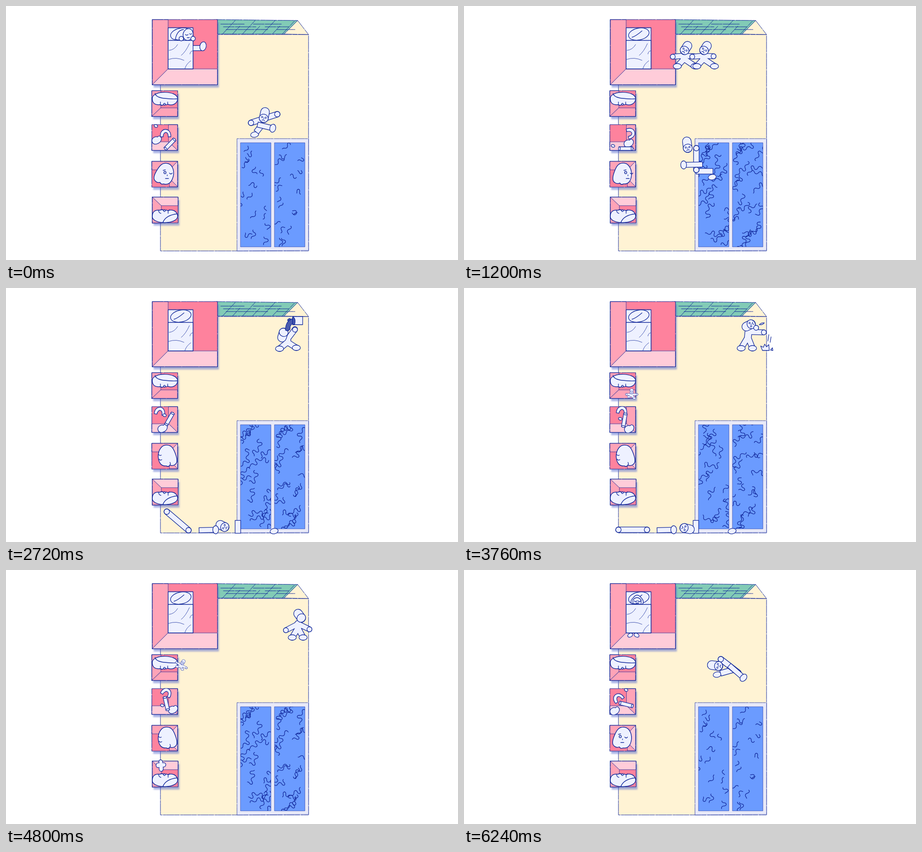
Write an HTML page with a canvas that moves like this. It is 998x561 px and loops after 6.32 s.

```html
<!DOCTYPE html>
<html lang="en">
<head>
<meta charset="utf-8">
<title>House loop</title>
<style>
html, body { margin: 0; width: 100%; height: 100%; overflow: hidden; background: #fff; }
canvas { display: block; }
</style>
</head>
<body>
<canvas id="stage" width="998" height="561"></canvas>
<script>
const c = document.getElementById('stage').getContext('2d');
const LOOP = 6320, STEP = 80, TAU = Math.PI * 2;
const INK = '#12289a', SKIN = '#eef1ff', CREAM = '#fff3d4', GREEN = '#82cbb6', POOL = '#6b9bff';
const ROSE = '#fe829d', PINK = '#ffa3b7', PALE = '#ffccd9', DRINK = '#4a5cae';
const ROUGH = [17, 1, 6, 2, 11, 1];

// ---- drawing helpers ----
function paint(path, fill, width = 1.3) {
  if (fill) { c.fillStyle = fill; c.fill(path); }
  if (width) { c.strokeStyle = INK; c.lineWidth = width; c.stroke(path); }
}
const draw = (d, fill, width) => paint(new Path2D(d), fill, width);
function oval(x, y, rx, ry = rx, a = 0, fill = SKIN, width) {
  const p = new Path2D();
  p.ellipse(x, y, rx, ry, a, 0, TAU);
  paint(p, fill, width);
}
function local(x, y, a, s, fn) {
  c.save();
  c.translate(x, y);
  c.rotate(a);
  c.scale(s, s);
  fn();
  c.restore();
}
function clipped(x, y, w, h, fn) {
  c.save();
  c.beginPath();
  c.rect(x, y, w, h);
  c.clip();
  fn();
  c.restore();
}
function rough(d, fill, width = 1) {
  c.setLineDash(ROUGH);
  draw(d, fill, width);
  c.setLineDash([]);
}
// Bars share one outline, so that overlapping ones merge.
function bars(list, cap) {
  c.lineCap = cap;
  for (const [extra, color] of [[2.6, INK], [0, SKIN]]) {
    c.strokeStyle = color;
    for (const [x1, y1, x2, y2, w] of list) {
      const k = cap === 'butt' ? extra / 2 / Math.hypot(x2 - x1, y2 - y1) : 0;
      const dx = (x2 - x1) * k, dy = (y2 - y1) * k;
      c.lineWidth = w + extra;
      c.beginPath();
      c.moveTo(x1 - dx, y1 - dy);
      c.lineTo(x2 + dx, y2 + dy);
      c.stroke();
    }
  }
  c.lineCap = 'round';
}

// ---- timing helpers ----
const lerp = (a, b, k) => a + (b - a) * k;
const clamp = k => Math.min(1, Math.max(0, k));
function span(keys, t) {
  let i = 0;
  while (i < keys.length - 2 && t >= keys[i + 1][0]) i++;
  const [a, b] = [keys[i], keys[i + 1]];
  return [a.slice(1), b.slice(1), clamp((t - a[0]) / (b[0] - a[0]))];
}
function mix(keys, t) {
  const [a, b, k] = span(keys, t);
  return a.map((v, i) => lerp(v, b[i], k));
}
// A key with only a time repeats the one before it.
function filled(keys) {
  keys.forEach((key, i) => { if (key.length === 1) key.push(...keys[i - 1].slice(1)); });
  return keys;
}
// Turns a segment about its centre, so that it keeps its length.
function turn(keys, t) {
  const polar = ([x, y, u, v]) => [(x + u) / 2, (y + v) / 2, Math.hypot(u - x, v - y) / 2, Math.atan2(v - y, u - x)];
  const [a, b, k] = span(keys, t), p = polar(a), q = polar(b);
  q[3] = p[3] + Math.atan2(Math.sin(q[3] - p[3]), Math.cos(q[3] - p[3]));
  const [x, y, r, an] = p.map((v, i) => lerp(v, q[i], k));
  const dx = r * Math.cos(an), dy = r * Math.sin(an);
  return [x - dx, y - dy, x + dx, y + dy];
}
function random(seed) {
  return () => (seed = (seed * 16807) % 2147483647) / 2147483647;
}

// ---- house ----
function house() {
  rough('M341 63H668V541H341Z', CREAM);
  rough('M460 30L644 32L614 62H460Z', GREEN);
  rough('M644 32L668 63L614 62Z', CREAM);
  for (let i = 0; i < 3; i++) rough(`M${474 + i * 6} ${40 + i * 6}h${52 + i * 20}m20 0h${64 - i * 12}`);
  for (let x = 478; x < 612; x += 22) rough(`M${x} 62l${x % 4 ? 28 : 17} ${x % 4 ? -30 : -18}`);
  draw('M510 293H668V541H510Z', '#e8e9f8', 0);
  rough('M510 541V293H668V540Z', null, .8);
}
function pool(t) {
  const p = (t % 2080) / 2080, fullness = .42 + .85 * Math.sin(Math.PI * p);
  for (const left of [518, 593]) {
    draw(`M${left} 302h67v230h-67Z`, POOL, .6);
    clipped(left, 302, 67, 230, () => {
      const rnd = random(left * 71), path = new Path2D();
      for (let i = 0; i < 19; i++) {
        let x = left - 8 + rnd() * 67 + 4 * Math.sin(TAU * (p + rnd()));
        let y = 312 + i * 12 + rnd() * 14;
        const lean = -.75 + (rnd() - .5) * 1.3, a = rnd() * TAU, b = rnd() * TAU;
        const n = (16 + rnd() * 26) * fullness;
        path.moveTo(x, y);
        for (let s = 0; s < n; s++) {
          const dir = lean + 1.25 * Math.sin(s * .5 + a) + .8 * Math.sin(s * .17 + b + TAU * p);
          path.lineTo(x += 2 * Math.cos(dir), y += 2 * Math.sin(dir));
        }
      }
      paint(path);
    });
  }
}
function tile(x, y, size, walls) {
  const square = `M${x} ${y}h${size}v${size}h${-size}Z`;
  c.save();
  c.shadowColor = 'rgba(85,105,205,.5)';
  c.shadowOffsetX = 3;
  c.shadowOffsetY = 6;
  c.shadowBlur = 3;
  draw(square, ROSE, 0);
  c.restore();
  for (const [d, color] of walls) draw(d, color, .8);
  rough(square, null, 1.2);
}

// ---- bedroom ----
function bedroom(t) {
  tile(323, 30, 144, [['M323 30H358V139L323 174Z', PINK], ['M358 139H467V174H323Z', PALE]]);
  const turned = t < 240, asleep = t >= 5840;
  draw('M358 48H413V139H358Z', SKIN);
  if (asleep) for (const s of [-1, 1]) oval(374 + 7 * s, 144, 6, 4, s / 2);
  oval(386, 62, 23, 13, -.2);
  if (turned) {
    bars([[408, 93, 431, 93, 10]], 'butt');
    oval(435, 89, 7, 10, .2);
  } else draw('M371 69Q379 67 393 55');
  if (asleep) local(382, 66 + 10 * clamp((6080 - t) / 240), 0, 1, () => {
    draw('M-12 8Q-16 2-8-5Q0-16 9-5Q17 3 12 10Z', SKIN);
    draw('M-9 10V0Q0-10 9 0V10M-6 2q3 4 6 0m2 0q3 4 6 0M-2 7h6');
  });
  draw('M358 76H413V139H358Z', SKIN);
  draw('M360 98Q372 97 379 85M387 109Q397 101 405 83M406 106q1-6 6-7M359 118q17-6 34 2M395 138q3-10 13-17', null, .8);
  if (turned) {
    draw('M392 52Q378 53 374 73Q385 78 393 72', SKIN);
    oval(402, 63, 11, 13, .25);
    draw('M396 63q3 3 6 0m3-2q2 3 5 0M400 70h5');
    for (const x of [387, 413]) oval(x, 72, 5);
  }
}

// ---- small rooms ----
function bean(y, flip) {
  c.save();
  c.translate(351, y);
  c.scale(1, flip);
  draw('M-28 0C-28-18 28-18 28 1C27 13 15 17 6 13Q2 16-1 12Q-5 17-11 14C-22 15-28 11-28 0Z', SKIN, 1.5);
  draw(flip > 0 ? 'M-22-11Q-20-2-1 0T27 1M-10 8v6M6 8v5' : 'M-5-14Q1 3 27 6M-14 14q0-6 5-7M7 7q-1 6 3 8');
  oval(-1, 13, 2);
  c.restore();
}
function topHead() {
  tile(322, 187, 57, [['M322 187H342V225L322 244Z', PINK], ['M342 225H379V244H322Z', PINK]]);
  bean(204, 1);
}
const FLOAT = [ // time, arc x y turn, dot x y, tube x y turn, bean x y
  [0, 353, 284, 0, 331, 265, 362, 305, -.8, 333, 296],
  [1200, 366, 282, 1.3, 329, 309, 357, 315, 0, 364, 303],
  [1920, 349, 290, -.7, 359, 279, 363, 305, -1.1, 334, 312],
  [2720, 340, 275, .2, 350, 281, 361, 289, -1.05, 346, 310],
  [3760, 349, 273, .2, 345, 289, 354, 292, -1.4, 365, 311],
  [4800, 354, 273, .5, 345, 299, 354, 295, -1.8, 369, 308],
  [6240, 342, 284, -.6, 358, 265, 358, 297, -2.9, 333, 311]
];
function floaters(t) {
  tile(322, 262, 57, [['M359 262H379V319L359 300Z', PINK], ['M322 300H359L379 319H322Z', PALE]]);
  const [ax, ay, aa, dx, dy, tx, ty, ta, bx, by] = mix(FLOAT, t);
  clipped(321, 261, 59, 59, () => {
    local(bx, by, -.25, 1, () => draw('M-11 1C-11-8 0-9 3-6C9-11 13-2 9 3C6 9-11 12-11 1Z', SKIN));
    local(ax, ay, aa, 1, () => draw('M-12 5C-15-16 12-18 11 5H5C6-8-6-8-6 5Z', SKIN));
    local(tx, ty, ta, 1, () => {
      draw('M-15-4H15V4H-15Z', SKIN);
      for (const x of [-14, 14]) oval(x, 0, 2, 4);
    });
    oval(dx, dy, 4, 3, .3);
  });
}
const GAZE = [[0, 6, .2], [1200, 12, 0], [1920, 0, .05], [2320, -6, 0], [5600, -6, 0], [6240, 0, .05]];
function turningHead(t) {
  tile(322, 343, 57, [['M322 343H379L361 362H322Z', PINK], ['M379 343V399L361 381V362Z', PALE], ['M361 381L379 399H361Z', PINK]]);
  const away = t > 2320 && t < 5600, [o, a] = mix(GAZE, t);
  c.save();
  c.translate(away ? 356 : 350, 371);
  c.rotate(a);
  if (away) c.scale(-1, 1);
  draw('M-1-24C12-26 20-13 20 1C19 17 12 23 2 22Q-3 25-6 20Q-12 23-17 19C-24 15-21 3-18-5C-14-16-10-23-1-24Z', SKIN, 1.5);
  if (away) draw('M19-3q-3 3-6 1m5 9q-3 4-6 1M-6 20q-2-3 0-6');
  c.restore();
  if (away) return;
  oval(345 + o, 368, 2.5);
  draw(`M${341 + o} 363l5-1m9 7q3 4 6 0m-15 12h7m-3-8v2`);
}
function lowHead(t) {
  tile(323, 422, 57, [['M323 422H380V441H343Z', PALE], ['M323 422L343 441V480H323Z', PINK]]);
  if (t > 4480 && t < 5360) local(342, 432 + (4800 - t) / 60, 0, clamp((t - 4480) / 240), () => {
    draw('M-4-6C-7-15 5-15 4-6C13-9 13 4 5 3C8 16-6 16-4 4C-13 7-13-8-4-6Z', SKIN);
  });
  bean(465, -1);
}

// ---- people ----
function head(fx, fy, hx, hy, back) {
  bars([[fx, fy, hx, hy, 18]], 'round');
  local(fx, fy, Math.atan2(hy - fy, hx - fx) + Math.PI / 2, 1, () => {
    oval(0, 0, 10, 9);
    if (back) return;
    for (const x of [-4, 4]) oval(x, -2, 1.6, 1.6, 0, SKIN, 1);
    draw('M0-1v2M-3 5q3-3 6 0', null, 1.2);
  });
}
function person([fx, fy, tilt, nx, ny, ax, ay, bx, by, lx, ly, rx, ry], back) {
  const px = lerp(nx, (lx + rx) / 2, .3), py = lerp(ny, (ly + ry) / 2, .3);
  bars([[nx, ny, px, py, 14], [px, py, lx, ly, 11], [px, py, rx, ry, 11], [nx, ny, ax, ay, 10], [nx, ny, bx, by, 10]], 'round');
  oval(lx, ly, 9, 6);
  oval(rx, ry, 9, 6);
  head(fx, fy, fx + 12 * Math.cos(tilt), fy + 12 * Math.sin(tilt), back);
  oval(ax, ay, 5.5);
  oval(bx, by, 5.5);
}
const POSES = filled([ // time, face, tilt, neck, two hands, two feet
  [240, 402, 66, -3, 404, 80, 389, 74, 417, 75, 426, 104, 437, 92],
  [640, 440, 94, -.9, 442, 106, 420, 110, 463, 109, 430, 133, 456, 133],
  [1200, 530, 98, -1, 527, 110, 504, 112, 551, 111, 514, 133, 553, 133],
  [1920, 621, 93, -.7, 621, 106, 600, 106, 658, 103, 615, 133, 637, 131],
  [2320, 618, 91, -3.7, 619, 108, 634, 97, 640, 92, 606, 133, 640, 132],
  [2720, 613, 98, -4.4, 621, 114, 638, 91, 638, 92, 604, 134, 641, 132],
  [3120],
  [3600, 634, 80, -3.6, 628, 97, 645, 88, 662, 98, 612, 133, 637, 133],
  [4160],
  [4800, 652, 106, -2.2, 645, 119, 618, 133, 670, 131, 632, 149, 656, 149],
  [5120]
]);
const LAG = [[560, 0], [1200, -43], [1920, -23], [2240, 0]];
const GLASS = filled([[1760, 636, 108, 0], [1920, 642, 104, 0], [2640, 644, 72, -1.57], [3120], [3520, 670, 122, 1]]);

function glass(t) {
  if (t >= 2560 && t < 3120) {
    draw('M634 67Q617 72 617 93Q622 97 627 91Q626 81 636 77Z', DRINK);
    oval(625, 70, 3.5, 2, -.5, DRINK);
  }
  if (t >= 1760 && t < 3600) {
    const [x, y, a] = mix(GLASS, t);
    local(x, y, a, 1, () => {
      draw('M-9-11H9V11H-9Z', SKIN);
      if (t < 2800) draw('M-9-11H9Q4-3-9-7Z', DRINK);
    });
  }
  if (t >= 3600 && t < 4480) {
    draw('M655 128l6 3l3-7l4 6l5-5l1 13h-15ZM677 137l4-5l1 6Z', SKIN);
    if (t < 4000) draw('M671 117l2-14m3 17l2-12');
    draw('M652 81q5-5 11-4q-4 5-11 4Z', SKIN);
  }
}
function walker(t) {
  if (t < 240 || t >= 5120) return;
  const pose = mix(POSES, t), [lag] = mix(LAG, t);
  if (t > 640 && t < 1920) {
    const swing = Math.sin((t - 1200) / 360 * TAU);
    pose[9] += 10 * swing;
    pose[11] -= 10 * swing;
    pose[10] -= 4 * Math.abs(swing);
  }
  local(0, 20 * clamp((t - 4800) / 320), 0, 1, () => {
    if (lag < -1) local(lag, 0, 0, 1, () => person(pose));
    person(pose, t > 4320 || (t > 2400 && t < 3300));
  });
  glass(t);
}

// Each body part: time, then both ends.
const ARMS = [[-80, 567, 197, 606, 227], [0, 541, 258, 599, 239], [1200, 513, 314, 513, 362],
  [1920, 464, 350, 499, 394], [2560, 355, 494, 403, 535], [2720, 355, 494, 403, 535], [3040, 341, 534, 404, 534]];
const FACE = [[-80, 562, 212, 547, 210], [0, 569, 248, 572, 234], [1200, 494, 314, 492, 299],
  [1920, 478, 366, 487, 361], [2560, 483, 528, 473, 523], [2720, 483, 528, 473, 523], [3040, 486, 530, 499, 533]];
const LEG = [[-80, 586, 211, 617, 238], [0, 556, 262, 589, 270], [1200, 526, 350, 485, 351],
  [1920, 515, 435, 479, 428], [2560, 427, 535, 463, 534]];
const THIGH = [[-80, 592, 221, 567, 228], [0, 564, 264, 553, 278], [1200, 513, 365, 549, 365],
  [1920, 530, 436, 533, 463], [2560, 512, 514, 512, 541]];
const FOOT = [[-80, 559, 231], [0, 549, 284], [1200, 548, 378], [1920, 597, 501], [2560, 592, 537]];

function body(u) {
  const left = i => u < 4000 + i * 80;
  const arms = turn(ARMS, u), leg = turn(LEG, u);
  if (left(4)) oval(...mix(FOOT, u), 9, 6, u > 1200 && u < 2560 ? 1.6 : -.2);
  if (left(3)) bars([[...turn(THIGH, u), 11]], 'butt');
  if (left(0)) {
    bars([[...arms, 11]], 'round');
    oval(arms[0], arms[1], 6);
    oval(arms[2], arms[3], 6);
  }
  if (left(2)) head(...turn(FACE, u));
  if (left(1)) {
    bars([[...leg, 10]], 'butt');
    oval(leg[2], leg[3], 6.5, 9, Math.atan2(leg[3] - leg[1], leg[2] - leg[0]));
  }
}
function faller(t) {
  const u = t < 4480 ? t : t - LOOP;
  if (u < -1200) return;
  // Tumbles off the roof edge until it reaches its first key.
  const k = clamp((-80 - u) / 1120);
  local(582 + 58 * k, 215 - 62 * k, 1.5 * k, 1, () => {
    c.translate(-582, -215);
    body(u);
  });
}
const CLIMB = [[3440, 358, 228, 0, .2], [3760, 370, 235, 0, .38], [4800, 387, 210, .5, .4], [5120, 376, 199, .6, .25]];
function climber(t) {
  if (t < 3440 || t > 5120) return;
  const [x, y, a, s] = mix(CLIMB, t), kick = 5 * Math.sin(t / 90);
  local(x, y, a, s, () => person([0, -12, -1.5, 0, 1, -30, 0, 32, 0, -16, 18 + kick, 16, 18 - kick]));
}

function frame(now) {
  const t = Math.floor((now % LOOP) / STEP) * STEP;
  c.fillStyle = '#fff';
  c.fillRect(0, 0, 998, 561);
  for (const part of [house, pool, bedroom, topHead, floaters, turningHead, lowHead, climber, faller, walker]) part(t);
}
c.lineCap = c.lineJoin = 'round';
const start = performance.now();
function tick(now) {
  frame(Math.max(0, now - start));
  requestAnimationFrame(tick);
}
requestAnimationFrame(tick);
</script>
</body>
</html>
```
